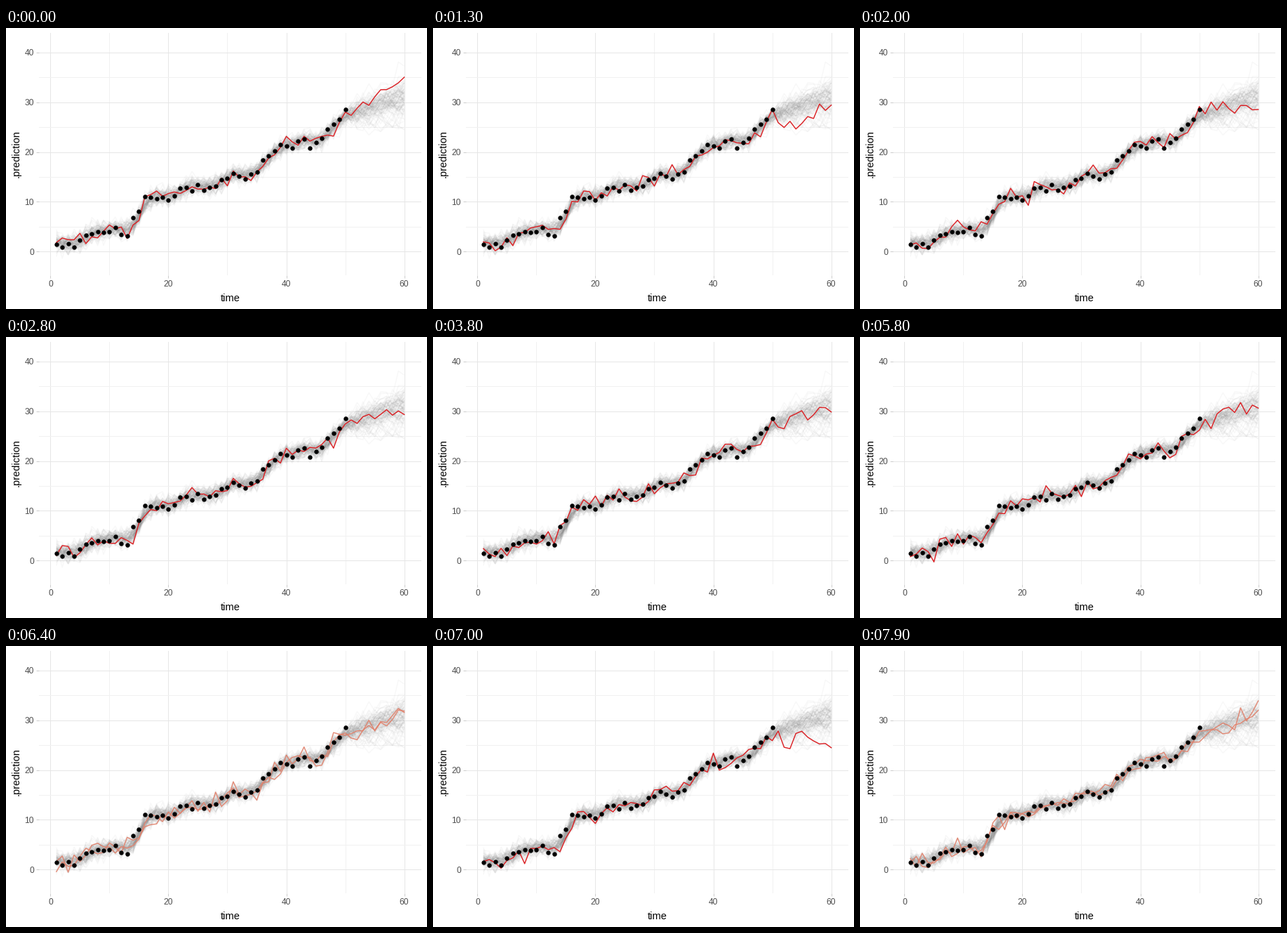
Recreate the animation shown at these times as a matplotlib script. Size 600 px wide and 400 px high, loop 8 s.

```python
import numpy as np
import matplotlib.pyplot as plt
from matplotlib.animation import FuncAnimation
from matplotlib.collections import LineCollection
from matplotlib.ticker import MultipleLocator

W, H, DPI = 600, 400, 100
FRAMES, STEP_MS = 80, 100
N_DRAWS, N_TIME = 100, 60
LEFT, RIGHT, TOP, BOTTOM = 47, 592.4, 7, 352
RED, FADED = "#dc2024", "#e2806a"
plt.rcParams["font.family"] = "Liberation Sans"


def pt(px):
    return px * 72 / DPI


# The measured series shown as dots
observed = np.array([
    1.5, .95, 1.65, .85, 2.35, 3.25, 3.55, 3.95, 3.8, 4.05,
    4.9, 3.45, 3.2, 6.8, 8.05, 11, 10.95, 10.65, 10.9, 10.3,
    11.15, 12.8, 12.9, 12.2, 13.4, 12.3, 12.85, 13.15, 14.5, 14.65,
    15.75, 15.1, 14.6, 15.6, 16, 18.35, 19.25, 20.25, 21.45, 21.2,
    20.8, 22.2, 22.65, 20.8, 21.9, 22.75, 24.6, 25.55, 26.55, 28.5])
n_obs = len(observed)
t = np.arange(1, N_TIME + 1)


def make_draws(seed=12):
    """Noise around a lagging fit, then a random walk with drift."""
    rng = np.random.default_rng(seed)
    padded = np.pad(observed, (2, 1), mode="edge")
    fit = np.convolve(padded, [.1, .3, .35, .25], "valid") + .4
    ahead = N_TIME - n_obs
    center = np.r_[fit, np.linspace(27.8, 30.8, ahead)]
    noise = rng.normal(0, .95, (N_DRAWS, N_TIME))
    spread = np.where(rng.random((N_DRAWS, 1)) < .12, 1.4, .6)
    noise[:, n_obs:] += np.cumsum(rng.normal(0, spread, (N_DRAWS, ahead)), axis=1)
    return center + noise


draws = make_draws()

fig = plt.figure(figsize=(W / DPI, H / DPI), dpi=DPI, facecolor="white")
ax = fig.add_axes([LEFT / W, 1 - BOTTOM / H, (RIGHT - LEFT) / W, (BOTTOM - TOP) / H])
ax.set_xlim(-1.95, 62.95)
ax.set_ylim(-4.74, 43.9)
for spine in ax.spines.values():
    spine.set_visible(False)

for axis, major, minor in ((ax.xaxis, 20, 10), (ax.yaxis, 10, 5)):
    axis.set_major_locator(MultipleLocator(major))
    axis.set_minor_locator(MultipleLocator(minor))
ax.set_axisbelow(True)
ax.grid(which="major", color="#e6e6e6", lw=pt(1))
ax.grid(which="minor", color="#f1f1f1", lw=pt(1))
ax.tick_params(which="major", length=pt(3.7), width=pt(1), color="#cccccc",
               pad=pt(3.3), labelsize=pt(12), labelcolor="#4d4d4d")
ax.tick_params(which="minor", length=0)

title = dict(size=pt(14.67), ha="center", va="baseline")
fig.text((LEFT + RIGHT) / 2 / W, 1 - 389 / H, "time", **title)
fig.text(19 / W, 1 - (TOP + BOTTOM) / 2 / H, ".prediction", rotation=90,
         rotation_mode="anchor", **title)

ax.add_collection(LineCollection([np.c_[t, d] for d in draws], colors="#7f7f7f",
                                 alpha=.05, linewidths=pt(1.42), zorder=2), autolim=False)
lines = [ax.plot([], [], lw=pt(1.42), zorder=3)[0] for _ in range(2)]
ax.plot(t[:n_obs], observed, "o", color="black", ms=pt(6.4), mew=0, zorder=4)


def update(k):
    # Every fifth step shows two neighbouring draws in mid-fade
    fading = k % 5 == 4
    shown = (k - 1, k + 1) if fading else (k, k)
    for line, i in zip(lines, shown):
        line.set_data(t, draws[i])
        line.set_color(FADED if fading else RED)
        line.set_alpha(.9 if fading else 1)
    lines[1].set_visible(fading)
    return lines


anim = FuncAnimation(fig, update, frames=FRAMES, interval=STEP_MS,
                     repeat=True, repeat_delay=0, blit=False)
plt.show()
```
